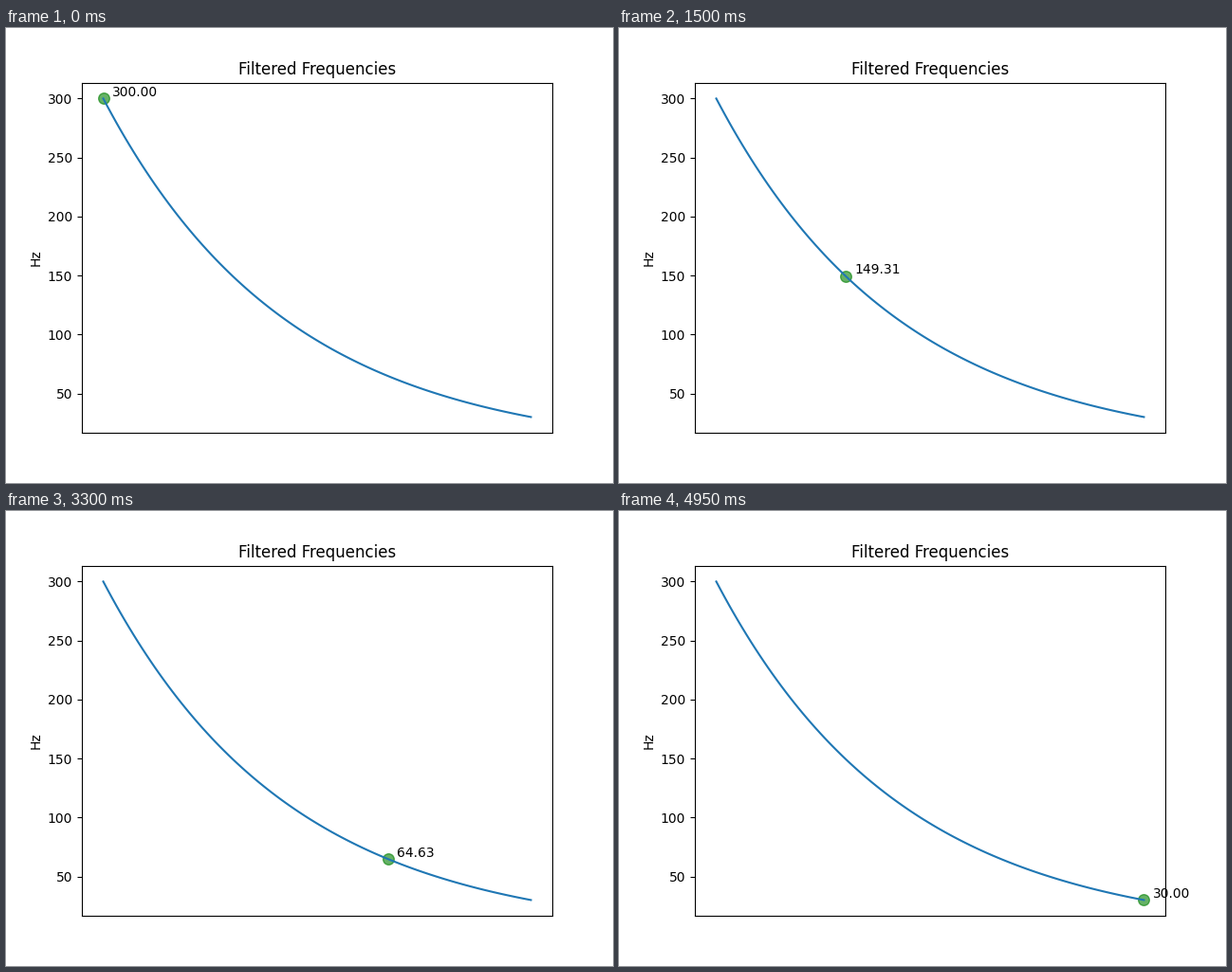
Write a matplotlib script that moves like this. It is 640 px wide and 480 px high and loops after 7000 ms.

```python
import matplotlib.pyplot as plt
import numpy as np
from matplotlib.animation import FuncAnimation

STEPS = 100
FRAMES = 140  # the marker rests at the end of the curve
INTERVAL = 50
LABEL_OFFSET = 2

plt.rcParams["font.family"] = "DejaVu Sans"

steps = np.arange(STEPS)
freqs = np.geomspace(300, 30, STEPS)

fig, ax = plt.subplots(figsize=(6.4, 4.8), dpi=100)
ax.plot(steps, freqs)
ax.set_title("Filtered Frequencies")
ax.set_ylabel("Hz")
ax.set_xticks([])

dot = ax.scatter([steps[0]], [freqs[0]], s=70, color="green", alpha=0.6)
label = ax.text(0, 0, "")


def update(frame):
    i = min(frame, STEPS - 1)
    x, y = steps[i], freqs[i]
    dot.set_offsets([(x, y)])
    label.set_position((x + LABEL_OFFSET, y + LABEL_OFFSET))
    label.set_text(f"{y:.2f}")
    return dot, label


anim = FuncAnimation(fig, update, frames=FRAMES, interval=INTERVAL,
                     repeat=True, repeat_delay=0)

plt.show()
```
